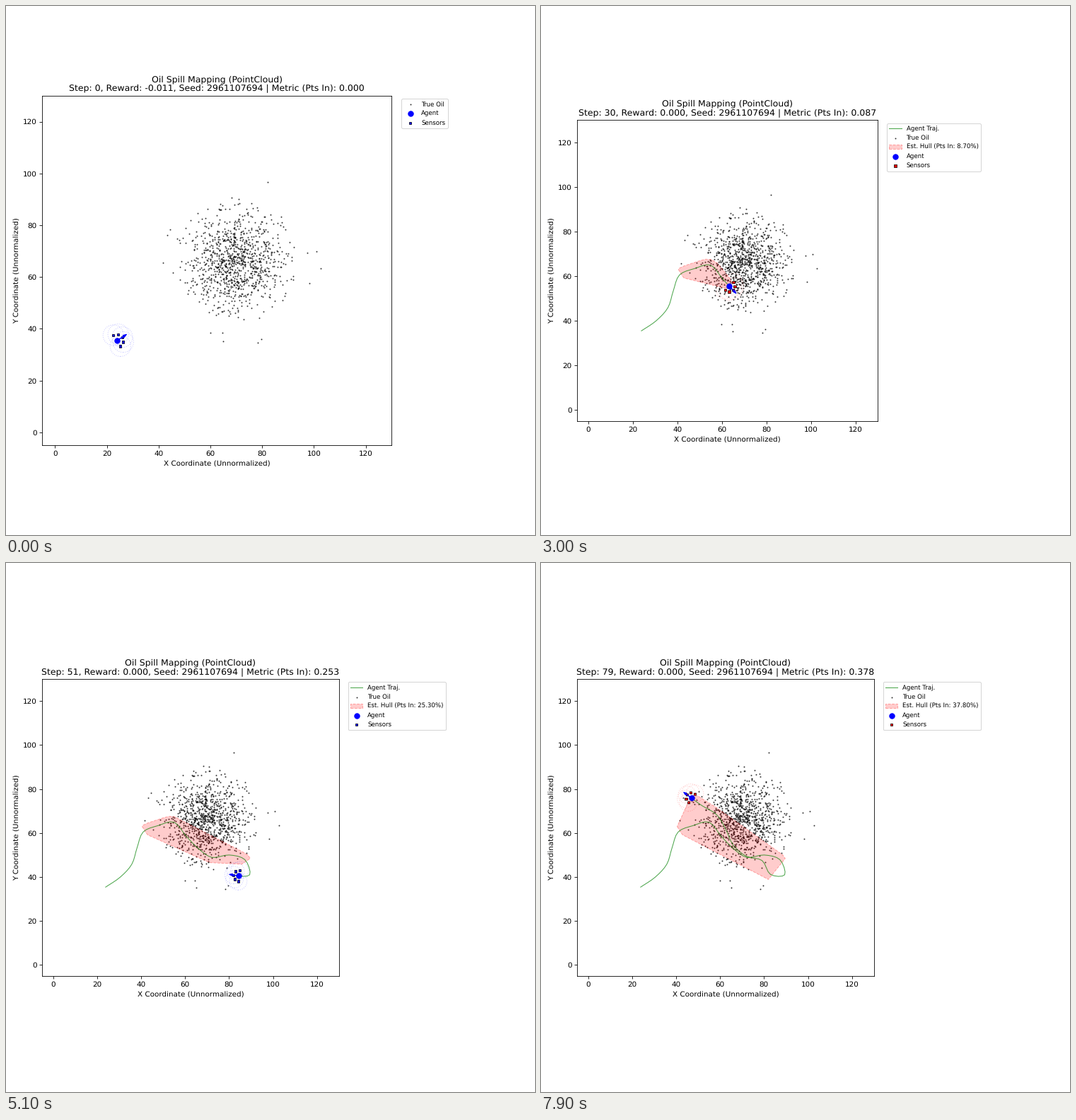
A matplotlib script for the animation above (8 s loop, 748x748 px).

```python
import numpy as np
import matplotlib.pyplot as plt
from matplotlib.animation import FuncAnimation
from matplotlib.patches import Circle, Polygon

SIZE = 748
STEPS = 80
STRIDE = 4
SENSE_RADIUS = 4.0
SENSOR_REACH = 2.5

# Agent position at every STRIDE steps, joined by a smooth curve.
ROUTE = [(23.9, 35.4), (30.5, 39.9), (35.8, 45.8), (38.2, 53.3), (41, 60.5),
         (47.9, 63.4), (55, 64.9), (60.6, 58.5), (66.2, 52.8), (72.3, 48.9),
         (80, 50), (87.2, 47.9), (89.4, 41), (82.9, 41.2), (79.1, 47.5),
         (72, 49.4), (66, 54.5), (62.6, 61.7), (58.5, 68.3), (51.7, 72.5),
         (45.5, 77)]

# Lone points far from the core of the spill.
STRAYS = [(82.1, 96.6), (44.4, 78.4), (43.3, 76.1), (41.6, 65.6),
          (45.6, 61.6), (59.9, 38.5), (64.6, 38.5), (65, 35.1), (78.2, 34.6),
          (79.6, 36), (78.8, 44.3), (87.9, 51), (98.2, 57.5), (102.7, 63.4),
          (100.9, 69.9), (97.5, 69.2)]

# (step, share of oil inside the hull)
COVERAGE = [(16, 0), (22, 0.011), (35, 0.135), (43, 0.239), (53, 0.257),
            (66, 0.257), (79, 0.378)]


def smooth_path(points):
    """Catmull-Rom curve sampled at every step."""
    p = np.array(points)
    p = np.vstack([2 * p[0] - p[1], p, 2 * p[-1] - p[-2]])
    i, t = np.divmod(np.arange(STEPS), STRIDE)
    t = t[:, None] / STRIDE
    a, b, c, d = (p[i + k] for k in range(4))
    return b + t / 2 * (c - a + t * (2 * a - 5 * b + 4 * c - d
                                     + t * (3 * (b - c) + d - a)))


def make_oil(total=1000):
    rng = np.random.default_rng(7)
    core = rng.normal(0, 9.5, (2 * total, 2))
    core = core[np.hypot(*core.T) < 24][:total - len(STRAYS)]
    return np.vstack([core + (69.7, 67), STRAYS])


def convex_hull(points):
    pts = sorted(map(tuple, points))

    def chain(seq):
        out = []
        for p in seq:
            while len(out) > 1:
                (x0, y0), (x1, y1) = out[-2:]
                if (x1 - x0) * (p[1] - y0) > (y1 - y0) * (p[0] - x0):
                    break
                out.pop()
            out.append(p)
        return out[:-1]

    return chain(pts) + chain(pts[::-1])


path = smooth_path(ROUTE)
oil = make_oil()
moves = np.diff(path, axis=0, prepend=[2 * path[0] - path[1]])
heading = np.arctan2(moves[:, 1], moves[:, 0])
angles = heading[:, None] + np.linspace(-np.pi / 2, np.pi / 2, 5)
sensors = path[:, None] + SENSOR_REACH * np.stack(
    [np.cos(angles), np.sin(angles)], axis=-1)
gaps = np.linalg.norm(sensors[:, :, None] - oil, axis=-1)
hits = gaps.min(axis=-1) < SENSE_RADIUS

plt.rcParams["text.hinting"] = "no_hinting"
fig = plt.figure(figsize=(10, 10), dpi=SIZE / 10, facecolor="white")
ax = fig.add_axes([0.1, 0.1, 0.8, 0.8])


def place_axes(side):
    """Square axes, fixed on the left and centred vertically."""
    ax.set_position([51 / SIZE, 0.5 - side / 2 / SIZE, side / SIZE, side / SIZE])


def draw(step):
    ax.clear()
    x, y = path[step]
    metric = round(float(np.interp(step, *zip(*COVERAGE))), 3)
    found = sensors[:step][hits[:step]]
    has_hull = len(found) >= 3

    if step:
        ax.plot(*path[:step + 1].T, color="green", lw=1, alpha=0.7,
                label="Agent Traj.")
    ax.scatter(*oil.T, s=1, c="black", alpha=0.65, label="True Oil")
    if has_hull:
        ax.add_patch(Polygon(convex_hull(found), facecolor=("red", 0.2),
                             edgecolor=("red", 0.3), ls="--",
                             label=f"Est. Hull (Pts In: {metric:.2%})"))
    ax.scatter(x, y, s=50, c="blue", zorder=5, label="Agent")

    colors = ["red" if hit else "blue" for hit in hits[step]]
    ax.scatter(*sensors[step].T, s=10, c=colors, marker="s",
               edgecolors="black", linewidths=0.7, zorder=5, label="Sensors")
    for spot, color in zip(sensors[step], colors):
        ax.add_patch(Circle(spot, SENSE_RADIUS, fill=False, ec=color,
                            ls=":", lw=1, alpha=0.2))
    ax.arrow(x, y, 3 * np.cos(heading[step]), 3 * np.sin(heading[step]),
             head_width=1, head_length=1.5, fc="blue", ec="blue", zorder=6)

    # The wider the legend, the smaller the axes.
    if has_hull:
        place_axes(419.8 if metric >= 0.1 else 425)
    else:
        place_axes(481.8 if step else 494.2)
    ax.set(xlim=(-5, 130), ylim=(-5, 130),
           xticks=range(0, 121, 20), yticks=range(0, 121, 20),
           xlabel="X Coordinate (Unnormalized)",
           ylabel="Y Coordinate (Unnormalized)")
    reward = 0.0 if step else -0.011
    ax.set_title("Oil Spill Mapping (PointCloud)\n"
                 f"Step: {step}, Reward: {reward:.3f}, Seed: 2961107694"
                 f" | Metric (Pts In): {metric:.3f}")
    ax.legend(loc="upper left", bbox_to_anchor=(1.02, 1), fontsize="small")
    return []


anim = FuncAnimation(fig, draw, frames=STEPS, interval=100,
                     init_func=lambda: [], repeat=True, repeat_delay=0)
plt.show()
```
